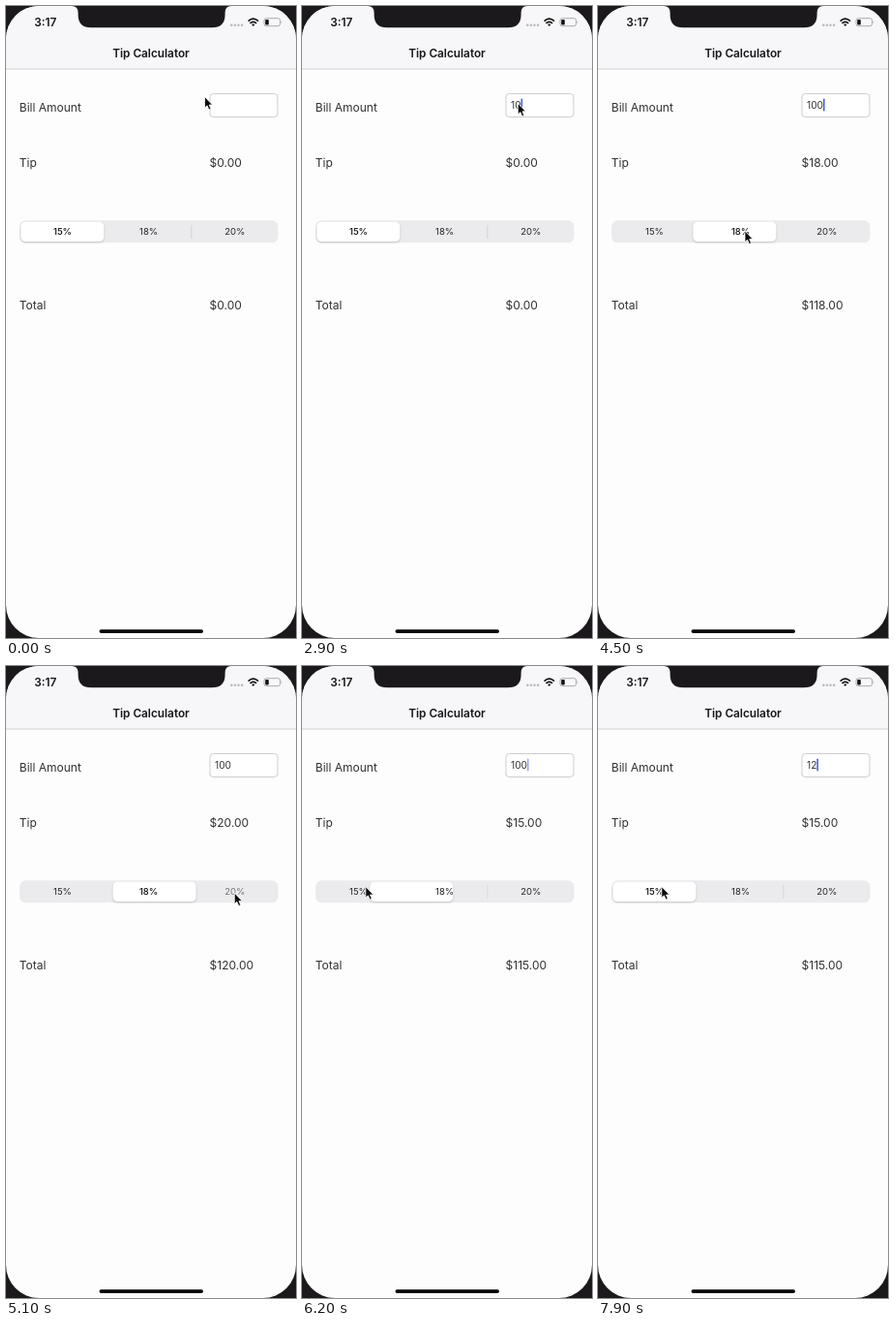
An HTML page for the animation above (8000 ms loop, 300 by 652 pixels).

```html
<!DOCTYPE html>
<html lang="en">
<head>
<meta charset="utf-8">
<title>Tip Calculator</title>
<style>
html, body { margin: 0; width: 100%; height: 100%; overflow: hidden; background: #1b191b; }
svg { display: block; width: 300px; height: 652px; }
text { font: 12px Inter, Roboto, sans-serif; fill: #303032; }
.bold { font-size: 11.8px; font-weight: 600; fill: #161517; }
#labels text { font-size: 9.5px; text-anchor: middle; fill: #262527; }
#labels text.on { font-weight: 500; fill: #111; }
#entry { font-size: 10.2px; }
#pill { filter: drop-shadow(0 1px 1.2px rgba(0, 0, 0, .18)); }
</style>
</head>
<body>
<svg viewBox="0 0 300 652">
  <defs><clipPath id="screen"><rect width="300" height="652" rx="34"/></clipPath></defs>
  <g clip-path="url(#screen)">
    <rect width="300" height="652" fill="#fefdfe"/>
    <rect width="300" height="65" fill="#f7f6f8"/>
    <rect y="64.5" width="300" height="1" fill="#d3d2d4"/>
  </g>
  <path d="M68 0Q74.6 0 74.6 7V9Q74.6 22.3 88 22.3H213Q226.6 22.3 226.6 9V7Q226.6 0 233 0Z" fill="#1b191b"/>

  <!-- Status bar -->
  <text class="bold" x="29.3" y="21">3:17</text>
  <path d="M233.3 19.7h11" stroke="#b5b4b6" stroke-width="2.4" stroke-linecap="round" stroke-dasharray="0 3.6"/>
  <path d="M250.6 15.6Q255.8 10.8 261 15.6M252.5 17.8Q255.8 14.8 259.1 17.8" fill="none" stroke="#111" stroke-width="1.7"/>
  <path d="M254.1 19.1Q255.8 17.8 257.5 19.1L255.8 20.9Z" fill="#111"/>
  <rect x="267" y="12.7" width="16.6" height="8" rx="2.3" fill="none" stroke="#a3a2a4" stroke-width=".9"/>
  <rect x="268.2" y="13.9" width="3.6" height="5.6" rx="1" fill="#111"/>
  <path d="M284.7 15.2Q286.2 16.7 284.7 18.2Z" fill="#a3a2a4"/>

  <text class="bold" x="150" y="52.6" text-anchor="middle">Tip Calculator</text>
  <text x="13.8" y="109.4">Bill Amount</text>
  <text x="13.8" y="165.6">Tip</text>
  <text x="13.8" y="312.7">Total</text>
  <text id="tip" x="210.6" y="165.6"></text>
  <text id="total" x="210.6" y="312.7"></text>

  <rect x="211" y="90.5" width="70" height="24" rx="3.5" fill="#fff" stroke="#cdccd0"/>
  <text id="entry" x="216" y="106"></text>
  <rect id="caret" y="95.5" width="1.5" height="13" rx=".7" fill="#3a58e0"/>

  <rect x="14" y="221.3" width="267.5" height="23" rx="6.5" fill="#ebeaec"/>
  <g id="seps" fill="#d6d5d8"></g>
  <rect id="pill" y="222.5" width="86" height="20.6" rx="5" fill="#fff"/>
  <g id="labels"></g>

  <rect x="96.5" y="643.2" width="107.5" height="3.8" rx="1.9" fill="#080808"/>
  <path id="pointer" d="M0 0V11.6L2.6 9.3L4.4 13.5L6.5 12.6L4.7 8.5H8.1Z"
        fill="#0c0c0c" stroke="#fff" stroke-width=".8"/>
</svg>
<script>
const $ = id => document.getElementById(id);

const STEP = 100, STEPS = 80;   // the screen updates ten times a second
const FOCUS = 13;
const BILL = 100, RATES = [15, 18, 20];

// Pointer moves: from step, to step, x, y
const START = [205.5, 93.5];
const moves = [
  [0, 5, 242, 97], [8, 13, 223.3, 100.3], [36, 39, 185, 226], [39, 42, 152, 232],
  [45, 49, 236.3, 234], [53, 57, 84, 233.5], [57, 59, 65.8, 227.5]
];
// Step and field content; the caret's blink restarts at each
const typing = [[16, ''], [25, '1'], [29, '10'], [32, '100'], [70, '10'], [71, '1'], [79, '12']];
// Step and tapped segment
const taps = [[43, 1], [51, 2], [61, 0]];

const clamp = v => Math.min(1, Math.max(0, v));
const mix = (a, b, p) => a + (b - a) * p;
const smooth = p => p * p * (3 - 2 * p);
const money = v => '$' + v.toFixed(2);
const pillX = i => 15.3 + 89.1 * i;
const sepShown = (i, segment) => +(segment !== i && segment !== i + 1);
const blink = age => age < 1 ? 1 : clamp(.65 + Math.cos((age - 2.7) * Math.PI / 5));

// Critically damped slide of the pill
function spring(age) {
  const u = .43 + 1.97 * age;
  return 1 - Math.exp(-u) * (1 + u);
}

$('labels').innerHTML = RATES.map((rate, i) => `<text x="${pillX(i) + 43.2}" y="236.4">${rate}%</text>`).join('');
$('seps').innerHTML = [1, 2].map(i => `<rect x="${pillX(i) - 2.2}" y="226" width="1" height="14"/>`).join('');
const labels = [...$('labels').children], seps = [...$('seps').children];

function drawPointer(n) {
  let [x, y] = START;
  for (const [from, to, nextX, nextY] of moves) {
    const p = smooth(clamp((n - from) / (to - from)));
    x = mix(x, nextX, p);
    y = mix(y, nextY, p);
  }
  $('pointer').setAttribute('transform', `translate(${x} ${y})`);
}

function drawField(n) {
  const [start, text] = typing.findLast(key => key[0] <= n) || typing[0];
  $('entry').textContent = text;
  $('caret').setAttribute('x', 216 + (text && $('entry').getComputedTextLength()));
  $('caret').setAttribute('opacity', n < FOCUS ? 0 : blink(n - start));
}

function drawSegments(n) {
  const done = taps.filter(tap => tap[0] <= n);
  const [start, segment] = done.at(-1) || [-STEPS, 0];
  const old = done.length > 1 ? done.at(-2)[1] : 0;
  const p = spring(n - start), x = mix(pillX(old), pillX(segment), p);
  $('pill').setAttribute('x', x);
  labels.forEach((label, i) => {
    label.classList.toggle('on', Math.abs(x - pillX(i)) < 20);
    label.setAttribute('opacity', i === segment && n === start ? .6 : 1);
  });
  seps.forEach((sep, i) => sep.setAttribute('opacity', mix(sepShown(i, old), sepShown(i, segment), p)));

  const tip = done.length ? BILL * RATES[segment] / 100 : 0;
  $('tip').textContent = money(tip);
  $('total').textContent = money(tip && BILL + tip);
}

const begin = performance.now();
function frame() {
  const n = Math.floor((performance.now() - begin) / STEP) % STEPS;
  drawPointer(n);
  drawField(n);
  drawSegments(n);
  requestAnimationFrame(frame);
}
frame();
</script>
</body>
</html>
```
